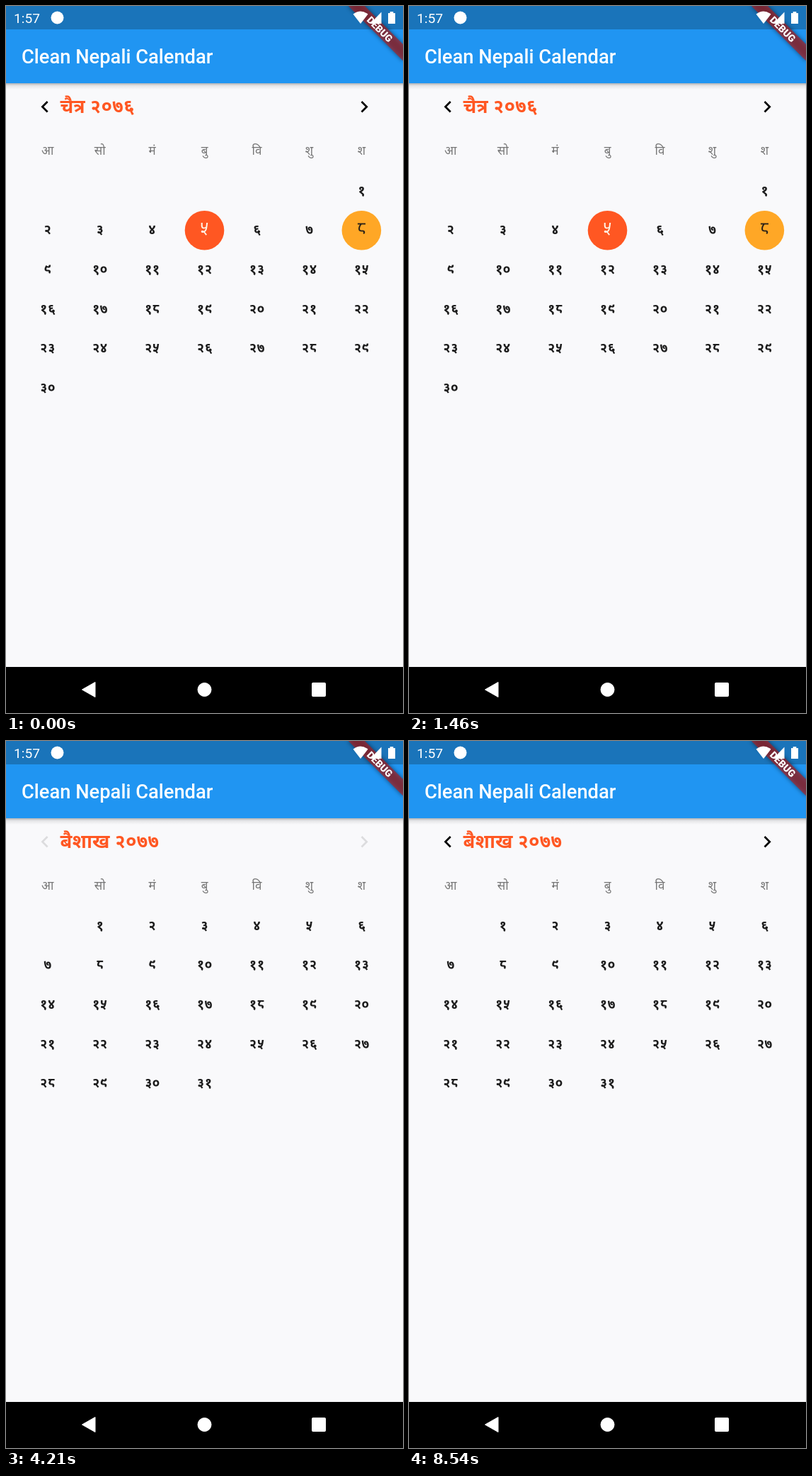
Recreate the animation shown at these times as an HTML page. Size 561 by 998 pixels, loop 8.58 s.

```html
<!DOCTYPE html>
<html lang="ne">
<head>
<meta charset="utf-8">
<title>Calendar</title>
<style>
  html, body { margin: 0; width: 100%; height: 100%; overflow: hidden; background: #f9f9fb; }
  svg { display: block; width: 561px; height: 998px; }
  text { font-family: Roboto, "Noto Sans", sans-serif; }
  .page text { font-family: "Noto Sans Devanagari", "Noto Sans", sans-serif; text-anchor: middle; }
  .page .month { font-size: 27.3px; font-weight: 700; fill: #ff5722; text-anchor: start; }
  .week { font-size: 17px; fill: #757575; }
  .day { font-size: 19.1px; font-weight: 700; fill: #1c1c1c; }
  .marked { font-size: 25px; fill: #2a2118; }
  .today { fill: #fff3e6; }
</style>
</head>
<body>
<svg viewBox="0 0 561 998">
  <defs>
    <clipPath id="pager"><rect x="11" y="109" width="539" height="824"/></clipPath>
    <clipPath id="screen"><rect width="561" height="933"/></clipPath>
    <linearGradient id="shade" x2="0" y2="1">
      <stop offset="0" stop-color="#000" stop-opacity=".28"/>
      <stop offset=".4" stop-color="#000" stop-opacity=".08"/>
      <stop offset="1" stop-color="#000" stop-opacity="0"/>
    </linearGradient>
    <filter id="blur" x="-20%" y="-60%" width="140%" height="220%"><feGaussianBlur stdDeviation="3"/></filter>
  </defs>

  <rect width="561" height="998" fill="#f9f9fb"/>
  <g clip-path="url(#pager)"><g id="pages"></g></g>
  <g id="chevrons">
    <path transform="translate(38.6 125.9) scale(1.3636)" d="M15.41 7.41 14 6l-6 6 6 6 1.41-1.41L10.83 12z"/>
    <path transform="translate(489.8 125.9) scale(1.3636)" d="M10 6 8.59 7.41 13.17 12l-4.58 4.59L10 18l6-6z"/>
  </g>

  <!-- app bar -->
  <rect y="109" width="561" height="9" fill="url(#shade)"/>
  <rect width="561" height="109" fill="#2095f2"/>
  <rect width="561" height="33" fill="#1a74ba"/>
  <text x="22" y="81" font-size="27.3" font-weight="500" fill="#fff">Clean Nepali Calendar</text>

  <!-- corner ribbon -->
  <g clip-path="url(#screen)">
    <g transform="translate(561 0) rotate(45)">
      <rect x="-54.5" y="38.2" width="109" height="16.4" opacity=".5" filter="url(#blur)"/>
      <rect x="-54.5" y="38.2" width="109" height="16.4" fill="#b71c1c" fill-opacity=".63"/>
      <text y="51.3" font-size="13.9" font-weight="900" fill="#fff" text-anchor="middle">DEBUG</text>
    </g>
  </g>

  <!-- status bar -->
  <g fill="#fff">
    <text x="11" y="24" font-size="19.2">1:57</text>
    <circle cx="72.5" cy="16.5" r="9"/>
    <path d="M501 25 490.5 11.5Q501 3.5 511.5 11.5Z"/>
    <path d="M514.5 25H530.5V8.5Z"/>
    <path d="M540 10h2.7V8h4.6v2h2.7v15h-10z"/>
  </g>

  <!-- navigation bar -->
  <rect y="933" width="561" height="65"/>
  <g fill="#fff" stroke="#fff" stroke-linejoin="round">
    <path d="M107.5 965 126 954.5V975.5Z"/>
    <circle cx="280.5" cy="965" r="9.5"/>
    <rect x="432.5" y="955.5" width="19" height="19" rx="1"/>
  </g>
</svg>

<script>
const LOOP = 8580, PAGE = 539, STIFF = 11.3, SETTLE = 800, FADE = 250;
const weekdays = ['आ', 'सो', 'मं', 'बु', 'वि', 'शु', 'श'];
const months = [
  { name: 'चैत्र २०७६', first: 6, days: 30, today: 5, picked: 8 },
  { name: 'बैशाख २०७७', first: 1, days: 31 },
  { name: 'जेष्ठ २०७७', first: 4, days: 32 }
];
const swipes = [
  { at: 3360, by: 1 },
  { at: 5360, by: 1 },
  { at: 7200, by: -1 }
];

const pages = document.getElementById('pages');
const chevrons = document.getElementById('chevrons');

function add(parent, tag, attrs, text = '') {
  const el = document.createElementNS('http://www.w3.org/2000/svg', tag);
  for (const key in attrs) el.setAttribute(key, attrs[key]);
  el.textContent = text;
  return parent.appendChild(el);
}

const colX = col => 280.5 + (col - 3) * 73.95;
const rowY = row => 260.7 + row * 55.7;
const nepali = n => String(n).replace(/\d/g, d => String.fromCharCode(0x966 + +d));

function addDay(page, month, day) {
  const cell = month.first + day - 1;
  const x = colX(cell % 7), y = rowY(Math.floor(cell / 7));
  const today = day === month.today, marked = today || day === month.picked;
  if (marked) add(page, 'circle', { cx: x, cy: y + .3, r: 27.8, fill: today ? '#ff5722' : '#ffa726' });
  const style = today ? 'marked today' : marked ? 'marked' : 'day';
  add(page, 'text', { x, y: y + (marked ? 6 : 5.8), class: style }, nepali(day));
}

months.forEach((month, i) => {
  const page = add(pages, 'g', { class: 'page', transform: `translate(${i * PAGE} 0)` });
  add(page, 'text', { x: 76.5, y: 151, class: 'month' }, month.name);
  weekdays.forEach((name, col) => add(page, 'text', { x: colX(col), y: 210, class: 'week' }, name));
  for (let day = 1; day <= month.days; day++) addDay(page, month, day);
});

const clamp = v => Math.min(1, Math.max(0, v));
const smooth = v => v * v * (3 - 2 * v);

// Critically damped spring from 0 to 1
function spring(ms) {
  if (ms <= 0) return 0;
  if (ms >= SETTLE) return 1;
  const s = ms / 1000 * STIFF;
  return 1 - (1 + s) * Math.exp(-s);
}

function draw(now) {
  const t = now % LOOP;
  let pos = 0, hidden = 0;
  for (const { at, by } of swipes) {
    pos += by * spring(t - at);
    hidden += smooth(clamp((t - at) / FADE)) - smooth(clamp((t - at - SETTLE) / FADE));
  }
  pages.setAttribute('transform', `translate(${(-pos * PAGE).toFixed(2)} 0)`);
  chevrons.setAttribute('opacity', 1 - hidden);
}

const start = performance.now();
function tick() {
  draw(performance.now() - start);
  requestAnimationFrame(tick);
}
tick();
</script>
</body>
</html>
```
